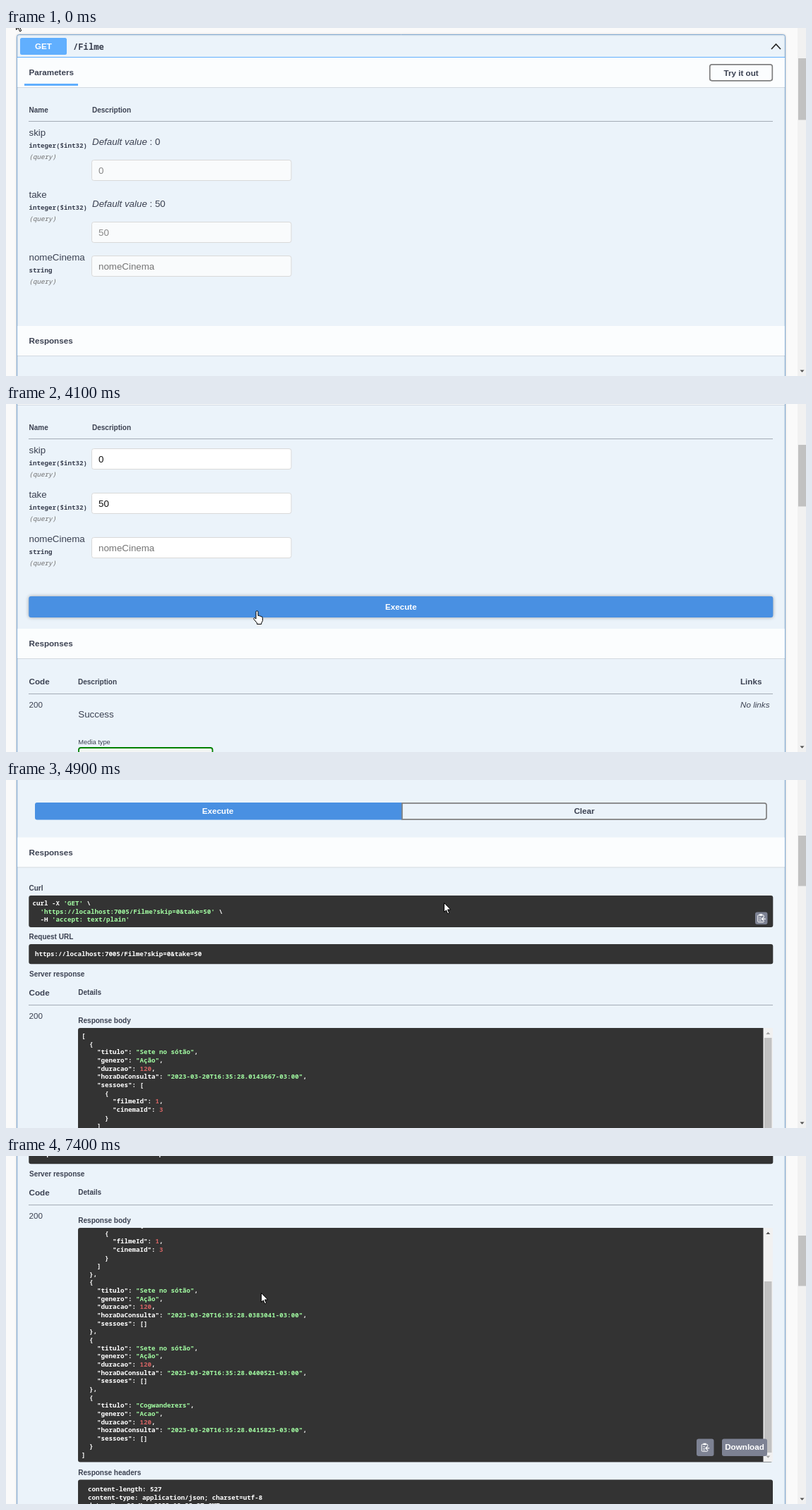
These frames come from a looping animation (1133 by 494 pixels, 8 s). An HTML page with a canvas:

```html
<!DOCTYPE html>
<html lang="pt">
<head>
<meta charset="utf-8">
<title>API explorer</title>
<style>
html, body { margin: 0; width: 100%; height: 100%; overflow: hidden; background: #fafafa; }
canvas { display: block; width: 1133px; height: 494px; }
</style>
</head>
<body>
<canvas id="stage" width="1133" height="494"></canvas>
<script>
const ctx = document.getElementById('stage').getContext('2d');
const W = 1133, H = 494, LOOP = 8000;
const SANS = '"Liberation Sans", Arial, sans-serif';
const MONO = '"Noto Sans Mono", "DejaVu Sans Mono", monospace';
const INK = '#3b4151', BLUE = '#61affe', EXEC = '#4990e2', DARK = '#333', SLATE = '#7d8293';
const GREEN = '#a2fca2', RED = '#d36363', RULE = 'rgba(59,65,81,.4)';
const CHAR = 5.5, LINE = 11.65;

const ARROW = new Path2D('M.5 .5V13.5L3.4 10.8 5.6 15.8 7.7 14.9 5.5 10H9.8z');
const HAND = new Path2D('M4 11V2.2a1.5 1.5 0 0 1 3 0V7.5q1.5-.8 2.3.6 1.6-.6 2.2.9 2-.3 2 1.7v4l-1.8 3.2V19.5H5.5v-1.6L1.2 12.8q-.9-1.5.3-2.2 1.2-.4 2.5 1.4z');

// [time, x, y, kind]
const POINTER = [
  [0, 14, -11, 'arrow'], [200, 60, 18, 'arrow'], [300, 190, 58, 'arrow'], [400, 360, 88, 'arrow'],
  [500, 540, 102, 'arrow'], [600, 700, 104, 'arrow'], [700, 830, 98, 'arrow'], [800, 930, 84, 'arrow'],
  [900, 985, 70, 'arrow'], [1000, 1038, 58, 'hand'], [1500, 767, 198, 'arrow'], [1600, 275, 212, 'beam'],
  [2600, 262, 200, 'beam'], [2700, 240, 176, 'arrow'], [2800, 222, 165, 'arrow'], [2900, 214, 160, 'arrow'],
  [3000, 220, 202, 'beam'], [3400, 270, 220, 'arrow'], [3500, 312, 250, 'arrow'], [3600, 344, 284, 'hand'],
  [3700, 354, 300, 'hand'], [4000, 350, 293, 'hand'], [4200, 390, 276, 'arrow'], [4300, 540, 205, 'arrow'],
  [4400, 620, 174, 'arrow'], [6300, 440, 189, 'arrow'], [6400, 361, 194, 'arrow']
];
const SCROLL = [[0, 0], [2100, 83], [4400, 250], [4500, 333], [5000, 500], [5400, 583]];
const BODY_SCROLL = [[0, 0], [7000, 83], [7400, 85]];
const MODES = [[0, 'idle'], [1200, 'edit'], [4200, 'loading'], [4900, 'done']];

const at = (track, t) => track.filter(key => key[0] <= t).pop();

function film(title, genre, stamp, sessions) {
  return ['  {', `    "titulo": "${title}",`, `    "genero": "${genre}",`, '    "duracao": 120,',
    `    "horaDaConsulta": "2023-03-20T16:35:28.${stamp}-03:00",`,
    ...(sessions ? ['    "sessoes": [', '      {', '        "filmeId": 1,', '        "cinemaId": 3', '      }', '    ]']
      : ['    "sessoes": []']), '  },'];
}
const BODY = ['[',
  ...film('Sete no sótão', 'Ação', '0143667', true),
  ...film('Sete no sótão', 'Ação', '0383041'),
  ...film('Sete no sótão', 'Ação', '0400521'),
  ...film('Cogwanderers', 'Acao', '0415823').slice(0, -1), '  }', ']'];
const EXAMPLE = ['[', '  {', '    "titulo": "string",', '    "genero": "string",', '    "duracao": 0,',
  '    "horaDaConsulta": "2023-03-20T19:35:27.881Z",', '    "sessoes": ['];
const CURL = ["curl -X 'GET' \\", "  'https://localhost:7005/Filme?skip=0&take=50' \\", "  -H 'accept: text/plain'"];
const HEADERS = ['content-length: 527', 'content-type: application/json; charset=utf-8', 'date: Mon,20 Mar 2023 19:35:27 GMT'];

function text(s, x, y, size = 11.67, style = '', color = INK, align = 'left', family = SANS) {
  ctx.font = `${style} ${size}px ${family}`;
  ctx.fillStyle = color;
  ctx.textAlign = align;
  ctx.fillText(s, x, y);
}
const bold = (s, x, y, size, color, align) => text(s, x, y, size, 'bold', color, align);
const mono = (s, x, y, color, style = 'bold', size = 9.167) => text(s, x, y, size, style, color, 'left', MONO);

function rect(x, y, w, h, color) {
  ctx.fillStyle = color;
  ctx.fillRect(x, y, w, h);
}

function box(x, y, w, h, fill, stroke, width = 1, r = 3) {
  ctx.beginPath();
  ctx.roundRect(x, y, w, h, r);
  if (fill) { ctx.fillStyle = fill; ctx.fill(); }
  if (stroke) { ctx.strokeStyle = stroke; ctx.lineWidth = width; ctx.stroke(); }
}

function line(points, color, width) {
  ctx.beginPath();
  points.forEach(([x, y]) => ctx.lineTo(x, y));
  ctx.strokeStyle = color;
  ctx.lineWidth = width;
  ctx.stroke();
}

function triangle(x, y, dir, color) {
  ctx.beginPath();
  ctx.moveTo(x - 3, y - dir * 1.5);
  ctx.lineTo(x + 3, y - dir * 1.5);
  ctx.lineTo(x, y + dir * 1.8);
  ctx.fillStyle = color;
  ctx.fill();
}

function shifted(dy, draw) {
  ctx.save();
  ctx.translate(0, dy);
  draw();
  ctx.restore();
}

function glow(on, draw) {
  ctx.save();
  if (on) { ctx.shadowColor = 'rgba(0,0,0,.35)'; ctx.shadowBlur = 5; }
  draw();
  ctx.restore();
}

function code(lines, x, y, tinted = true) {
  lines.forEach((row, i) => {
    const parts = tinted ? row.match(/"[^"]*"|'[^']*'|\d+|[^"'\d]+/g) : [row];
    let col = 0;
    parts.forEach(part => {
      const isKey = row[col + part.length] === ':';
      const color = !tinted || isKey ? '#fff' : /^["']/.test(part) ? GREEN : /^\d/.test(part) ? RED : '#fff';
      mono(part, x + col * CHAR, y + i * LINE, color);
      col += part.length;
    });
  });
}

function copyButton(x, y, size) {
  box(x, y, size, size, SLATE);
  ctx.save();
  ctx.translate(x + size / 2, y + size / 2);
  box(-5, -4.5, 8.5, 10, null, '#fff', 1, 1);
  rect(-2.7, -6, 4, 2.5, '#fff');
  [-1.5, 1, 3].forEach(y => rect(-3.2, y, 3, .8, '#fff'));
  rect(0, -1, 6, 4, SLATE);
  line([[6, 1], [1, 1]], '#fff', 1.2);
  line([[3, -1.2], [.7, 1], [3, 3.2]], '#fff', 1.2);
  ctx.restore();
}

function band(title, y) {
  rect(16, y, 1087, 42, '#fbfdfe');
  rect(16, y + 42, 1087, 1, 'rgba(0,0,0,.1)');
  bold(title, 32.5, y + 25);
}

function header(mode, hover) {
  box(20, 14, 66, 24, BLUE, null, 1, 2.5);
  bold('GET', 53, 30, 11.67, '#fff', 'center');
  mono('/Filme', 95, 30.5, INK, 'bold', 12.2);
  line([[1084, 30], [1090.5, 23], [1097, 30]], '#222', 1.6);
  rect(16, 41, 1087, 1, BLUE);
  band('Parameters', 42);
  rect(26, 79, 76, 3, BLUE);
  const idle = mode === 'idle';
  const left = idle ? 996.8 : 1007.3, color = idle ? '#808080' : '#fa5a55';
  glow(hover, () => box(left, 51.8, 1085.3 - left, 23, '#fbfdfe', color, 1.7));
  bold(idle ? 'Try it out' : 'Cancel', (left + 1085.3) / 2, 67.5, 11.67, idle ? INK : color, 'center');
}

function parameters(mode) {
  const idle = mode === 'idle';
  bold('Name', 32.5, 120, 10);
  bold('Description', 122, 120, 10);
  rect(32, 132, 1054, 1, RULE);
  [['skip', 'integer($int32)', '0'], ['take', 'integer($int32)', '50'], ['nomeCinema', 'string', '']]
    .forEach(([name, type, value], i) => {
      const y = 153 + i * (idle ? 88.4 : 63.2);
      text(name, 32.5, y, 13.33);
      mono(type, 32.5, y + 17, INK);
      mono('(query)', 32.5, y + 33, '#707070', 'italic');
      let top = Math.round(y - 7) + .5;
      if (idle && value) {
        text('Default value', 122, y + 13, 13.33, 'italic');
        text(' : ' + value, 199.8, y + 13, 13.33);
        top += 41;
      }
      box(121.5, top, 282.5, 29, idle ? '#f9fbfc' : '#fff', '#d9d9d9');
      const color = !value ? '#757575' : idle ? '#888' : '#111';
      text(value || name, 131, top + 19, 13.33, '', color);
    });
}

function spinner(elapsed) {
  ctx.save();
  ctx.globalAlpha = Math.min(1, elapsed / 500);
  ctx.lineWidth = 1.7;
  const start = -Math.PI * .75 + elapsed / 1000 * Math.PI * 2;
  [['rgba(85,85,85,.1)', Math.PI * 2], ['rgba(0,0,0,.6)', Math.PI / 2]].forEach(([color, sweep]) => {
    ctx.beginPath();
    ctx.arc(559.7, 450, 24.2, start, start + sweep);
    ctx.strokeStyle = color;
    ctx.stroke();
  });
  ctx.restore();
  bold('LOADING', 559.5, 453, 8.33, INK, 'center');
}

function execute(disabled, hover) {
  ctx.save();
  if (disabled) ctx.globalAlpha = .35;
  glow(hover, () => box(32.3, 356, 1054, 30, EXEC));
  ctx.restore();
  bold('Execute', 559.3, 375, 11.67, '#fff', 'center');
}

function documentation() {
  band('Responses', 402);
  bold('Code', 32.5, 481);
  bold('Description', 102, 480.5, 10);
  bold('Links', 1040, 481);
  rect(32, 494, 1054, 1, RULE);
  text('200', 32.5, 514);
  text('No links', 1040, 514, 11.67, 'italic');
  text('Success', 102.3, 528, 13.33);
  text('Media type', 102.3, 566, 9.3);
  box(103, 571, 189.5, 23, '#f5f6f6', '#008000', 1.8);
  bold('text/plain', 112, 586);
  line([[271, 580.5], [275, 584.5], [279, 580.5]], '#222', 1.5);
  text('Controls', 102.3, 606, 9.2, '', '#008000');
  mono('Accept', 139.5, 606, '#008000', '', 8.4);
  text('header.', 172.7, 606, 9.2, '', '#008000');
  bold('Example Value', 102.3, 632, 10);
  rect(176.5, 623, 1, 12, RULE);
  text('Schema', 182, 632, 10);
  box(102, 648, 914.5, 400, DARK);
  code(EXAMPLE, 107, 662.5);
}

function responseBody(scroll) {
  box(102, 352, 984, 332.5, DARK);
  ctx.save();
  ctx.beginPath();
  ctx.rect(102, 352, 970, 332.5);
  ctx.clip();
  code(BODY, 107, 366 - scroll);
  ctx.restore();
  rect(1072.5, 352, 13.5, 332, '#f1f1f1');
  rect(1074, 366 + scroll * .73, 10.5, 243, '#c1c1c1');
  triangle(1079.3, 359.5, -1, scroll > 0 ? '#505050' : '#a3a3a3');
  triangle(1079.3, 677, 1, scroll < 85 ? '#505050' : '#a3a3a3');
  copyButton(978, 651.5, 24.5);
  box(1014, 651.5, 64, 24.5, SLATE);
  bold('Download', 1046, 667, 11.67, '#fff', 'center');
}

function result(bodyScroll) {
  box(41, 32, 520, 24.5, EXEC, null, 1, [3, 0, 0, 3]);
  box(561, 32.8, 516, 23, null, '#808080', 1.7, [0, 3, 3, 0]);
  bold('Execute', 300, 48, 11.67, '#fff', 'center');
  bold('Clear', 819, 48, 11.67, INK, 'center');
  band('Responses', 81.5);
  bold('Curl', 32.5, 157, 10);
  box(32.3, 164, 1054, 45, DARK);
  code(CURL, 37.5, 178);
  copyButton(1061, 187.5, 17.5);
  bold('Request URL', 32.5, 226, 10);
  box(32.3, 233, 1054, 28.3, DARK);
  code(['https://localhost:7005/Filme?skip=0&take=50'], 41, 250, false);
  bold('Server response', 33, 278.5, 10);
  bold('Code', 32.5, 305.5);
  bold('Details', 102.3, 305, 10);
  rect(32, 319, 1054, 1, RULE);
  text('200', 32.5, 338.5);
  bold('Response body', 102.3, 345, 10);
  responseBody(bodyScroll);
  bold('Response headers', 102.3, 702.5, 10);
  box(102, 709.5, 984, 90, DARK);
  code(HEADERS, 116, 726, false);
}

function pageScrollbar(mode, scroll) {
  rect(1121, 0, 12, H, '#f1f1f1');
  const [top, height] = {
    idle: [43, 87.5],
    edit: [44 + scroll * .168, 87.5],
    loading: [44 + scroll * .158, 85.5],
    done: [33.7 + scroll * .136, 71.5]
  }[mode];
  rect(1122, top, 11, height, '#c1c1c1');
  triangle(1127.5, 487, 1, '#505050');
}

function pointer([, x, y, kind]) {
  ctx.save();
  ctx.translate(x, y);
  if (kind === 'beam') {
    rect(-2, 5, 4, .7, 'rgba(0,0,0,.1)');
    rect(-.3, 0, .7, 5, 'rgba(0,0,0,.07)');
  } else {
    const shape = kind === 'hand' ? HAND : ARROW;
    ctx.fillStyle = '#fff';
    ctx.fill(shape);
    ctx.strokeStyle = '#000';
    ctx.lineWidth = 1;
    ctx.stroke(shape);
  }
  ctx.restore();
}

function draw(time) {
  const t = Math.floor(time / 100) * 100;
  const mode = at(MODES, t)[1], scroll = at(SCROLL, t)[1], cursor = at(POINTER, t);
  const hover = cursor[3] === 'hand';
  rect(0, 0, W, H, '#fafafa');
  shifted(-scroll, () => {
    ctx.save();
    ctx.shadowColor = 'rgba(0,0,0,.19)';
    ctx.shadowBlur = 3;
    box(15.5, 9.5, 1088, 1600, '#ebf3fa', '#7fa9d4');
    ctx.restore();
    header(mode, hover && t < 2000);
    parameters(mode);
    if (mode === 'idle') {
      band('Responses', 423);
    } else if (mode === 'done') {
      shifted(333, () => result(at(BODY_SCROLL, t)[1]));
    } else {
      const loading = mode === 'loading';
      execute(loading, hover && t > 2000);
      if (loading) spinner(t - 4125);
      shifted(loading ? 97 : 0, documentation);
    }
  });
  pageScrollbar(mode, scroll);
  pointer(cursor);
}

const begin = performance.now();
function tick() {
  draw((performance.now() - begin) % LOOP);
  requestAnimationFrame(tick);
}
tick();
</script>
</body>
</html>
```
